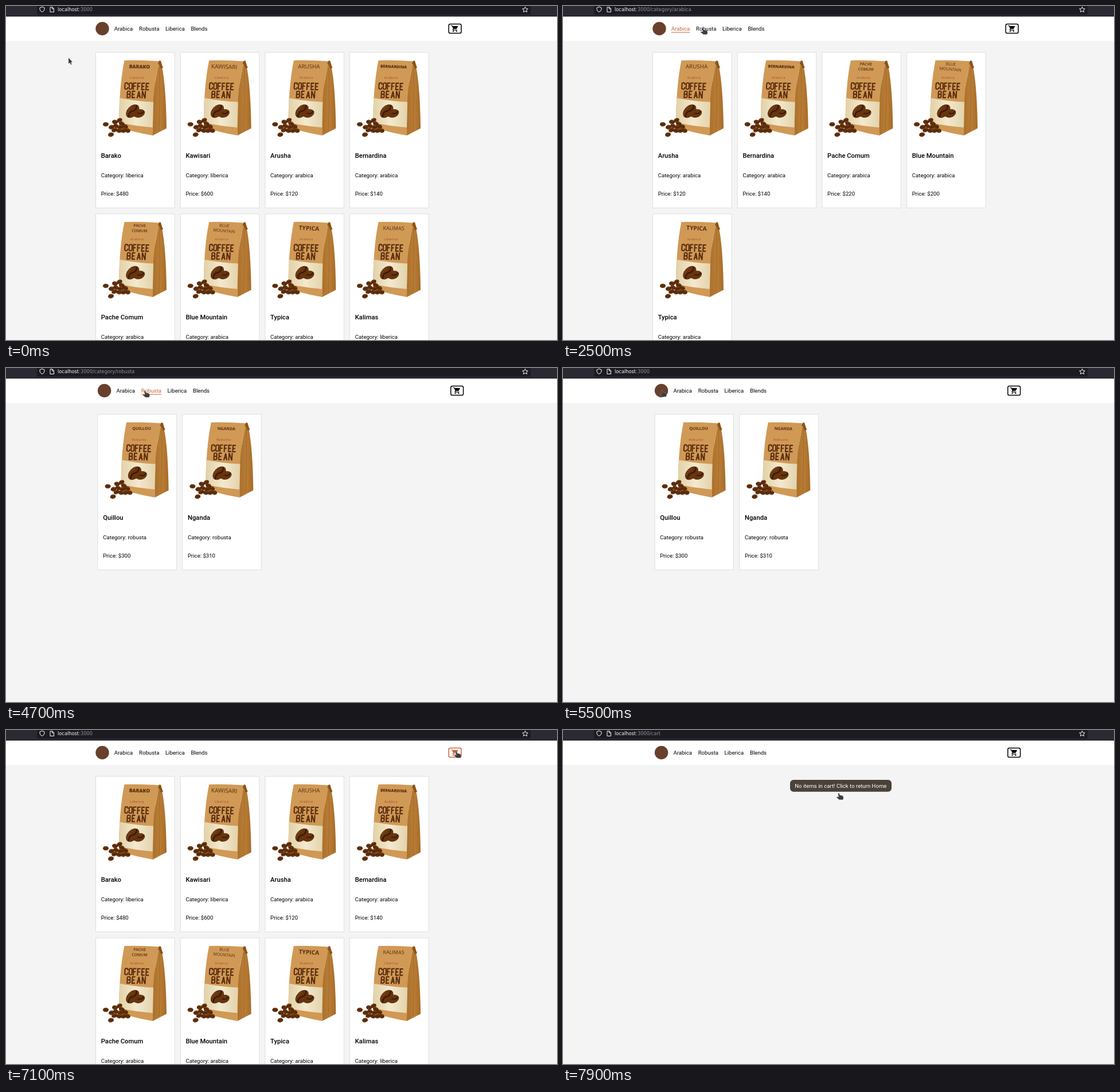
An HTML page that plays this animation: 961 px wide and 583 px high, repeating every 8 s.

```html
<!DOCTYPE html>
<html lang="en">
<head>
<meta charset="utf-8">
<title>Coffee shop</title>
<style>
  html, body { margin: 0; width: 100%; height: 100%; overflow: hidden; background: #f4f4f4; }
  svg { display: block; width: 961px; height: 583px; }
  text { font: 9.6px Roboto, sans-serif; white-space: pre; }
  .title { font-size: 11.23px; font-weight: 500; }
  .chrome { font: 8.28px "DejaVu Sans", sans-serif; fill: #fbfbfe; }
  .dim { fill: #92919b; }
  .name { font-family: "Open Sans", sans-serif; fill: #5b2e10; text-anchor: middle; }
  .kind { font: 5.5px "Open Sans", sans-serif; letter-spacing: .6px; fill: #a8402b; text-anchor: middle; }
  .link line { stroke: none; }
  .link.on text { fill: #cb6338; }
  .link.on line { stroke: #cb6338; }
  #cart { color: #000; }
  #cart.on { color: #cb6338; }
</style>
</head>
<body>
<svg id="stage" viewBox="0 0 961 583">
  <defs>
    <linearGradient id="cream"><stop stop-color="#e2d1a7"/><stop offset=".5" stop-color="#f3e9cf"/><stop offset="1" stop-color="#e3d3ab"/></linearGradient>
    <linearGradient id="side"><stop stop-color="#a9702c"/><stop offset=".55" stop-color="#b97d36"/><stop offset="1" stop-color="#a66b28"/></linearGradient>
    <g id="bean">
      <ellipse rx="10" ry="6.6" fill="#66340f"/>
      <path d="M-9 1.500Q-4 -3 0 0T9 -1.500" fill="none" stroke="#351704" stroke-width="1.500"/>
      <path d="M-7 -2Q-2 -6 4 -4" fill="none" stroke="#7d4519" stroke-width=".8"/>
    </g>
    <!-- bag drawn relative to the card corner -->
    <g id="bag">
      <path d="M111 16L116 25Q123 60 124 133L100 145.500L99 80Z" fill="url(#side)"/>
      <path d="M112 26Q113 80 111 138" fill="none" stroke="#9c6524" stroke-width=".8"/>
      <path d="M50.500 14.500Q80 13.500 112 16Q103 48 101 82L100 145.500Q68 140 41 131Q41 60 50.500 14.500Z" fill="#d09955"/>
      <path d="M42 80Q72 86 101 87L99.800 131.500Q70 129 41 123Z" fill="url(#cream)"/>
      <path d="M111 15H114Q116 23 118 27L114 29Q112 22 109 20Z" fill="#8a5419"/>
      <g transform="translate(76.300 107) rotate(-18) scale(1.020 1.080)"><use href="#bean"/></g>
      <g transform="translate(64.800 103) rotate(-46) scale(1.380)"><use href="#bean"/></g>
      <g id="pile"></g>
      <g id="lettering" role="img" aria-label="Coffee bean" fill="none" stroke="#5b2e10" stroke-width="2.100"></g>
    </g>
  </defs>

  <rect width="961" height="583" fill="#f4f4f4"/>
  <rect y="18" width="961" height="43" fill="#fff"/>
  <rect width="961" height="18" fill="#2b2a33"/>
  <rect x="54" y="-6" width="861" height="21" rx="2" fill="#1c1b22"/>
  <rect y="17.200" width="961" height="1.200" fill="#15141a"/>
  <g fill="none" stroke="#fbfbfe" stroke-width="1">
    <path d="M63 1.500L67 3V6Q66.500 9 63 10.500Q59.500 9 59 6V3Z"/>
    <path d="M77 2H81L83.500 4.500V10.500H77ZM80.500 2V5H83.500"/>
    <path d="M905.500 1.500L907 4.700L910.300 5L907.800 7.300L908.600 10.600L905.500 8.900L902.400 10.600L903.200 7.300L900.700 5L904 4.700Z"/>
  </g>
  <text class="chrome" x="90" y="9.200">localhost<tspan class="dim" id="path"></tspan></text>

  <g id="site">
    <circle cx="168" cy="39.500" r="11.700" fill="#68402b"/>
    <g id="nav"></g>
    <g id="cart" fill="currentColor">
      <rect x="772.200" y="31.600" width="21.800" height="15.900" rx="2.600" fill="none" stroke="currentColor" stroke-width="1.500"/>
      <path transform="translate(776 32.600) scale(.575)" d="M7 18a2 2 0 1 0 0 4a2 2 0 1 0 0-4zM1 2v2h2l3.600 7.600-1.350 2.450C4.500 15.400 5.500 17 7 17h12v-2H7.400l1.100-2h7.450c.75 0 1.410-.41 1.750-1.030L21.300 5.500A1 1 0 0 0 20.400 4H5.200L4.270 2zM17 18a2 2 0 1 0 0 4a2 2 0 1 0 0-4z"/>
    </g>
    <g id="pages"></g>
  </g>
  <g id="empty">
    <rect id="button" x="396" y="87" width="177" height="20.800" rx="6"/>
    <text x="484.300" y="100.800" text-anchor="middle" fill="#fff">No items in cart! Click to return Home</text>
  </g>
  <g id="status">
    <rect x="-1" y="569" width="147" height="15" rx="2" fill="#2b2a33" stroke="#52525e" stroke-width=".6"/>
    <text class="chrome" id="hint" x="4" y="579.500"></text>
  </g>
  <g id="pointer" fill="#3d3d40" stroke="#fff" stroke-opacity=".45" stroke-width=".5">
    <path id="arrow" d="M0 0V11L2.400 9L4 12.600L5.800 11.800L4.200 8.400L7 8Z"/>
    <path id="hand" d="M-1.400 1Q-.6 -.6 .6 .5L2 4Q4 3.600 5 4.400Q7.200 4.400 7.800 6L8.200 9Q8 10.500 6.800 11.800H.8Q-1 10 -3.800 8Q-4.200 6.400 -2.400 6.500L-.2 7Z"/>
  </g>
</svg>
<script>
const $ = id => document.getElementById(id);
const LOOP = 8000, STEP = 100, SHIFT = 3.6;

// name: category, price, bag lettering size, weight, tilt
const products = {
  'Barako': ['liberica', 480, 8.6, 800, 1],
  'Kawisari': ['liberica', 600, 10.2, 400, 2],
  'Arusha': ['arabica', 120, 9.8, 400, 0],
  'Bernardina': ['arabica', 140, 6.8, 800, 2],
  'Pache Comum': ['arabica', 220, 6.8, 600, 1],
  'Blue Mountain': ['arabica', 200, 7.2, 400, 5],
  'Typica': ['arabica', 240, 10.2, 700, 3],
  'Kalimas': ['liberica', 520, 9, 400, 1],
  'Quillou': ['robusta', 300, 7.2, 700, 0],
  'Nganda': ['robusta', 310, 7, 700, 1]
};
const names = Object.keys(products);
const inCategory = c => names.filter(n => products[n][0] === c);
const lists = { home: names.slice(0, 8), arabica: inCategory('arabica'), robusta: inCategory('robusta') };
const links = { Arabica: [188.8, 32.5], Robusta: [232.1, 35.3], Liberica: [277.9, 33.8], Blends: [322.4, 29] };

const glyphs = {
  C: 'M5 3.500V2Q5 0 2.500 0T0 2V9Q0 11 2.500 11T5 9V7.500',
  O: 'M0 2Q0 0 2.500 0T5 2V9Q5 11 2.500 11T0 9Z',
  F: 'M0 12V0H5M0 5.500H4',
  E: 'M5 0H0V11H5M0 5.500H4',
  B: 'M0 0H3Q5 0 5 2.700T3 5.400H0M3 5.400Q5.300 5.500 5.300 8.200T3 11H0V0',
  A: 'M0 12L2.700 0L5.400 12M1 8H4.400',
  N: 'M0 12V-1L5.200 12V-1'
};
const letter = (word, x, y, pitch) => [...word].map((c, i) =>
  `<path transform="translate(${x + i * pitch} ${y + i * .2}) skewX(-3)" d="${glyphs[c]}"/>`).join('');
$('lettering').innerHTML = letter('COFFEE', 51.7, 53.6, 7.4) + letter('BEAN', 55.8, 68.2, 8.7);

const pile = [[18, 126, 0], [34, 122, 15], [42, 119, -25], [46, 125, 20], [28, 131, -10], [36, 129, 20],
  [44, 131, -10], [52, 130, 15], [33, 136, -20], [41, 137, 10], [49, 137, -15], [56, 137, 10], [27, 144, -10]];
$('pile').innerHTML = pile.map(([x, y, a]) =>
  `<g transform="translate(${x} ${y}) rotate(${a}) scale(.5 .58)"><use href="#bean"/></g>`).join('');

function card(name, i) {
  const [category, price, size, weight, tilt] = products[name];
  const words = name.toUpperCase().split(' ');
  const kind = category[0].toUpperCase() + category.slice(1);
  const lines = words.map((word, j) => {
    const y = 25.3 + size * .36 + (j - (words.length - 1) / 2) * 9;
    return `<text class="name" x="77" y="${y}" transform="rotate(${tilt} 77 25)" style="font-size:${size}px;font-weight:${weight}">${word}</text>`;
  }).join('');
  return `<g transform="translate(${156 + i % 4 * 147.7} ${80.5 + (i >> 2) * 282})">
    <rect x=".5" y=".5" width="137.500" height="271.500" fill="#fff" stroke="#dfdfdf"/>
    <use href="#bag"/>${lines}
    <text class="kind" x="72.500" y="46.500">${kind}</text>
    <text class="title" x="9.700" y="184.700">${name}</text>
    <text x="9.700" y="218.900">Category: ${category}</text>
    <text x="9.700" y="250.800">Price: $${price}</text></g>`;
}
$('pages').innerHTML = Object.entries(lists).map(([id, list]) => `<g id="${id}">${list.map(card).join('')}</g>`).join('');
$('nav').innerHTML = Object.entries(links).map(([name, [x, w]]) =>
  `<g class="link" id="${name}"><text x="${x}" y="43.300">${name}</text><line x1="${x}" x2="${x + w}" y1="46" y2="46"/></g>`).join('');

// each track: [start time, value]
const tracks = {
  page: [[0, 'home'], [2400, 'arabica'], [4200, 'robusta'], [5700, 'home'], [7200, 'empty']],
  path: [[0, ''], [1400, '/category/arabica'], [4000, '/category/robusta'], [5500, ''], [7200, '/cart']],
  hover: [[0, ''], [900, 'Arabica'], [3300, 'Robusta'], [4900, 'Arabica'], [5300, ''], [6900, 'cart'], [7500, ''], [7800, 'button']],
  hint: [[0, ''], [1100, 'arabica'], [1500, ''], [3300, 'robusta'], [4000, '']],
  pointer: [[0, 'arrow'], [900, 'hand'], [6200, 'arrow'], [6900, 'hand'], [7500, 'arrow'], [7800, 'hand']]
};
const moves = [[0, 109, 90], [100, 109, 90], [200, 110, 97], [400, 126, 96], [600, 160, 70], [800, 192, 46],
  [1000, 204, 38], [1100, 205, 37], [2300, 205, 37], [2400, 228, 39], [2500, 244, 38], [3900, 244, 38],
  [4000, 242.5, 39.5], [4700, 242.5, 39.5], [5100, 212, 42.5], [5500, 172.5, 38.5], [6000, 172.5, 38.5],
  [6200, 215, 54], [6400, 400, 73], [6600, 610, 70], [6900, 784, 38], [7100, 785.5, 37], [7400, 785.5, 37],
  [7500, 762, 46], [7700, 600, 84], [7900, 481, 110], [LOOP, 481, 110]];

const at = (track, t) => track.findLast(([start]) => start <= t)[1];
const show = (id, visible) => { $(id).style.display = visible ? '' : 'none'; };

function position(t) {
  const i = moves.findLastIndex(m => m[0] <= t);
  const [t0, x0, y0] = moves[i], [t1, x1, y1] = moves[i + 1];
  const k = (t - t0) / (t1 - t0);
  return [x0 + (x1 - x0) * k, y0 + (y1 - y0) * k];
}

function draw(t) {
  const page = at(tracks.page, t), hover = at(tracks.hover, t);
  const hint = at(tracks.hint, t), pointer = at(tracks.pointer, t);
  for (const id of [...Object.keys(lists), 'empty']) show(id, id === page);
  for (const id of [...Object.keys(links), 'cart']) $(id).classList.toggle('on', id === hover);
  const short = page === 'robusta' || page === 'empty';
  $('site').setAttribute('transform', `translate(${short ? SHIFT : 0} 0)`);
  $('path').textContent = ':3000' + at(tracks.path, t);
  $('button').setAttribute('fill', hover === 'button' ? '#4a413a' : '#3f332b');
  show('status', hint);
  $('hint').textContent = 'localhost:3000/category/' + hint;
  show('arrow', pointer === 'arrow');
  show('hand', pointer === 'hand');
  $('pointer').setAttribute('transform', `translate(${position(t)})`);
}

const begin = performance.now();
let last = -1;
function tick() {
  const t = Math.floor((performance.now() - begin) % LOOP / STEP) * STEP;
  if (t !== last) draw(last = t);
  requestAnimationFrame(tick);
}
tick();
</script>
</body>
</html>
```
